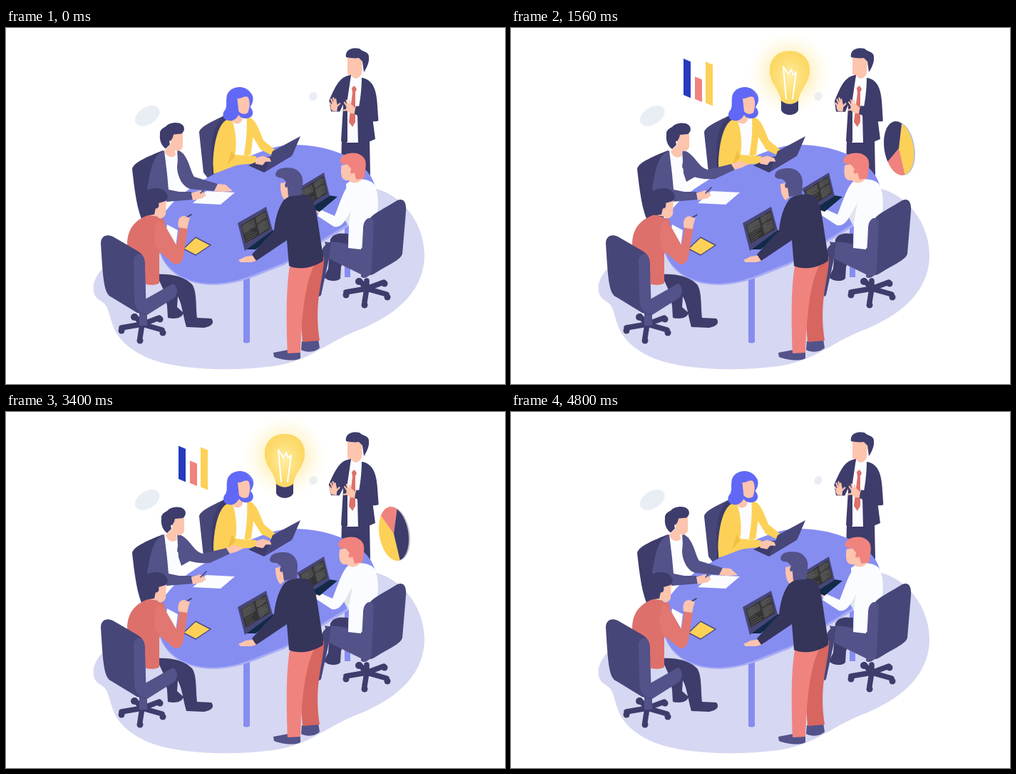
Animation of 700x500 px, one loop 4.84 s. Source, as an HTML page:

```html
<!DOCTYPE html>
<html lang="en">
<head>
<meta charset="utf-8">
<title>Team meeting</title>
<style>
html, body { margin: 0; width: 100%; height: 100%; overflow: hidden; background: #fff; }
svg { display: block; width: 100vw; height: 100vh; }
.navy { fill: #3d3c6b; } .slate { fill: #474679; } .steel { fill: #535289; }
.skin { fill: #fdc4ae; } .red { fill: #de706c; } .coral { fill: #f0837e; }
.yellow { fill: #fdd157; } .white { fill: #fbfcff; } .table { fill: #868df1; }
.line { fill: none; stroke-linecap: round; stroke-linejoin: round; }
</style>
</head>
<body>
<svg viewBox="0 0 700 500">
<defs>
  <radialGradient id="halo">
    <stop offset=".4" stop-color="#ffe58a" stop-opacity=".6"/>
    <stop offset=".7" stop-color="#fff0b8" stop-opacity=".3"/>
    <stop offset="1" stop-color="#fff8dc" stop-opacity="0"/>
  </radialGradient>
  <radialGradient id="shine">
    <stop offset="0" stop-color="#fff0a8"/>
    <stop offset="1" stop-color="#fbdc6c" stop-opacity=".6"/>
  </radialGradient>
  <clipPath id="screen"><path d="M0 0H35V27H0Z"/></clipPath>
  <path id="glass" d="M391 30C374 30 363 41 363 57C363 77 379 84 379 104H403C403 84 419 77 419 57C419 41 408 30 391 30Z"/>
  <g id="wheels">
    <path class="line" stroke="#3d3c6b" stroke-width="7.500" d="M191 405V418M162 421L191 416L219 424M188 435L191 416L215 407M191 416L181 405"/>
    <g class="navy"><circle cx="162" cy="425" r="4.500"/><circle cx="188" cy="439" r="4.500"/><circle cx="220" cy="428" r="4.500"/><circle cx="216" cy="409" r="4.500"/><circle cx="180" cy="406" r="5"/></g>
  </g>
</defs>

<path fill="#d6d7f2" d="M123 370C120 352 134 335 160 318L260 280L500 222C560 228 588 280 587 322C585 372 545 405 490 426C448 443 425 468 375 475C320 482 255 481 212 468C180 458 158 440 150 418C144 402 144 390 134 384C127 380 124 376 123 370Z"/>
<g fill="#e9eef5">
  <ellipse cx="198" cy="123.500" rx="19" ry="12" transform="rotate(-32 198 123)"/>
  <ellipse cx="431" cy="96" rx="5.500" ry="6.500" transform="rotate(25 431 96)"/>
</g>

<!-- back chairs -->
<path class="slate" d="M271 147C271 139 290 131 306 123L312 130L300 212H284L277 203Z"/>
<path class="navy" d="M306 123C294 134 288 148 288 180L289 212H302L312 130Z"/>
<path class="navy" d="M177 198C178 189 200 180 220 172L224 180L214 268H190C183 250 180 225 177 198Z"/>

<!-- presenter -->
<path class="navy" d="M471 156H510L511 207L470 196Z"/>
<path class="white" d="M483 67L500 70L495 161H478Z"/>
<path class="red" d="M485 84L489 81L492 86L490 90L490 132L486 139L481 132L486 91Z"/>
<path class="navy" d="M484 66L479 100L479 160L470 159L473 110L470 90C472 76 476 68 484 66ZM499 70C510 72 516 80 518 96L515 133L518 156L511 159L494 162L493 120C497 104 499 84 499 70Z"/>
<path class="skin" d="M479 40H500L499 64C495 72 488 73 485 67L479 65Z"/>
<path class="navy" d="M477 41C475 31 485 26 496 29C499 33 509 33 509 40C510 48 506 56 502 62L500 47L495 42C489 43 483 42 477 41Z"/>
<path class="navy" id="leftSleeve"/><path class="navy" id="rightSleeve"/>
<g id="leftHand">
  <path class="skin" d="M-6 4L-3 -3L2 -5L4 2L3 10L-4 9Z"/>
  <path class="line" stroke="#fdc4ae" stroke-width="2.200" d="M-4 3L-7 -2M-2 0L-5 -7M0 -1L-2 -9M2 0L1 -7M3 3L7 -1"/>
</g>
<g id="rightHand">
  <path class="skin" d="M-3 -4L3 -4L9 2L8 10L1 9L-4 5Z"/>
  <path class="line" stroke="#fdc4ae" stroke-width="2.200" d="M-2 0L-6 -6M-1 -2L-3 -9M2 -2L1 -8M-2 4L-7 5"/>
</g>

<!-- table -->
<path class="table" d="M333 340H342V441C340 443 335 443 333 441ZM475 270H483V350H475Z"/>
<path fill="#a9adf5" d="M212 292C212 338 248 361 290 361C330 360 350 348 390 333L480 279C510 264 523 248 519 225L212 280Z"/>
<path class="table" d="M212 290C212 335 247 359 290 359C330 358 350 344 390 330L480 275C508 261 521 247 518 225C512 188 458 164 405 164C372 164 340 180 300 201C260 221 212 252 212 290Z"/>

<!-- woman -->
<g id="woman">
  <path class="white" d="M318 131L340 128L337 184L321 184Z"/>
  <path class="yellow" d="M313 128C299 131 292 160 291 190L292 205L318 195C326 191 340 191 353 190L351 180L322 178C325 160 322 142 318 130ZM338 125C351 126 354 140 362 158L379 172L374 179L358 171L347 153L344 178L334 180C338 160 339 140 338 125Z"/>
  <path fill="#eab83f" d="M317 172L311 192L322 181Z" opacity=".7"/>
  <path class="skin" d="M321 120H332V129C330 136 320 136 318 130Z"/>
  <path fill="#6068f5" d="M310 98C311 82 334 78 343 90C350 97 347 106 343 111C350 118 347 127 337 127C332 127 329 125 327 122C323 129 318 131 313 130C304 129 303 120 308 115C311 109 309 104 310 98Z"/>
  <path class="skin" d="M325 99C330 100 335 94 340 97C344 104 342 113 340 119C335 122 330 121 327 117Z"/>
</g>
<path class="navy" d="M340 193L366 181L402 179L362 203Z"/>
<path class="slate" d="M374 173L413 152L402 178L363 202Z"/>
<path class="skin" id="typing" d="M350 182L360 179L370 182L372 187L364 187L360 192L350 190Z"/>

<!-- man in suit -->
<path class="white" d="M220 174L241 173L244 236H226Z"/>
<path class="steel" d="M222 172C206 178 203 198 198 226L206 238L226 244L262 241L260 230L243 230L228 227L226 205ZM240 170L249 177L260 208L246 216L242 204Z"/>
<path class="white" d="M262 246L281 229L321 231L301 248Z"/>
<path class="skin" d="M260 232L272 228L281 234L276 239L262 242Z"/>
<path class="line" stroke="#3d3c6b" stroke-width="1.500" d="M273 232L281 224"/>
<path class="steel" id="suitArm"/><path class="skin" id="suitHand"/>
<g id="suitHead">
  <path class="skin" d="M233 150L250 147L250 168C246 174 241 174 239 172L240 179C234 185 226 180 224 173L233 164Z"/>
  <path class="navy" d="M218 150C217 144 222 141 226 139C230 133 245 131 250 137C254 142 251 147 248 149L237 150C236 156 233 160 231 159L232 164L226 170C220 166 217 158 218 150Z"/>
</g>

<!-- man in red -->
<path class="white" d="M226 276L241 284L238 308L220 318Z"/>
<path class="yellow" stroke="#4d4c7d" stroke-width="1.500" stroke-linejoin="round" d="M249 310L266 294L287 305L266 319Z"/>
<path class="navy" d="M211 346C235 344 252 351 261 360C268 370 266 390 268 407L288 408C293 414 289 419 278 421L253 420C248 402 247 388 241 377L240 392L249 400C247 408 237 409 227 407L226 390L221 368Z"/>
<path class="steel" d="M190 384L234 359C241 362 242 372 236 379L198 403L190 400Z"/>
<use href="#wheels"/>
<path class="steel" d="M187 395H198V418H187Z"/>
<path class="red" d="M170 305C170 280 183 268 202 262L222 269L226 290L215 318V358C210 362 202 361 196 360L192 322Z"/>
<g id="redHead">
  <path class="skin" d="M208 243L225 240L224 262C220 269 215 268 212 265L202 263Z"/>
  <path class="navy" d="M190 242C190 233 195 230 200 227C208 223 222 225 225 232C229 238 225 242 224 243L214 246C216 252 211 255 210 253L208 262L199 263C193 258 190 250 190 242Z"/>
</g>
<g id="redArm">
  <path fill="#e27772" d="M213 272C207 283 206 302 214 313L234 330C242 335 247 329 249 320L255 281L244 277L239 305L224 279C220 272 216 270 213 272Z"/>
  <path class="line" stroke="#3d3c6b" stroke-width="1.600" d="M248 269L260 262"/>
  <path class="skin" d="M242 280C240 271 243 264 250 264L258 267L256 273L254 282Z"/>
</g>
<path class="slate" d="M133 303C133 292 141 289 150 293L181 311C192 317 195 322 195 335L196 403L184 400L148 378C137 374 136 350 133 303Z"/>
<path class="steel" d="M179 330C178 320 185 316 190 318C195 323 195 330 195 340L197 400C190 404 181 396 180 382Z"/>

<!-- man in white -->
<path class="navy" d="M455 297C460 287 470 288 480 289V304L470 336L469 352C463 357 452 356 446 350L452 338Z"/>
<path class="steel" d="M453 301C465 299 485 305 502 310L507 342L498 346L453 324L447 300Z"/>
<path class="slate" d="M456 301L453 324L442 375C440 378 436 378 434 375L442 318C443 309 447 303 456 301Z"/>
<use href="#wheels" x="315" y="-50"/>
<path class="white" d="M477 219C488 210 507 210 516 219C523 230 523 250 520 263L503 274L498 311L480 309L481 280L479 258Z"/>
<path fill="#dfe5e9" d="M487 240L472 262L480 278Z"/>
<g id="whiteArm">
  <path class="skin" d="M431 243L441 255L436 261L430 251Z"/>
  <path class="white" d="M480 216C472 222 466 242 458 262L438 253L434 262L457 277C465 279 471 272 475 265L489 240C493 225 488 214 480 216Z"/>
</g>
<g id="whiteHead">
  <path class="skin" d="M468 193L489 188L497 212C492 219 482 219 478 214C470 215 466 210 468 193Z"/>
  <path class="coral" d="M466 187C467 177 480 174 490 176C502 180 503 188 502 196L500 211L489 213L486 203C481 207 479 202 482 198L477 192C472 190 468 193 466 187Z"/>
</g>
<path class="slate" d="M509 270C512 262 530 254 549 242C558 238 562 245 561 258L556 317C554 326 535 333 515 346L500 350Z"/>
<path class="steel" d="M501 280C502 267 511 263 516 271L513 340C512 349 501 354 498 349Z"/>

<!-- laptops -->
<path fill="#122a48" d="M335 311L374 284L388 284L350 311ZM424 252L453 235L465 237L440 258Z"/>
<path class="slate" d="M325 274L365 251L374 284L335 313ZM408 226L446 203L454 236L424 255Z"/>
<g transform="matrix(1 -.59 .26 .96 329 277)" clip-path="url(#screen)" class="display"></g>
<g transform="matrix(.94 -.58 .22 .91 412 228)" clip-path="url(#screen)" class="display"></g>

<!-- standing man -->
<path class="steel" d="M375 456L396 452L413 454V464C404 469 386 466 376 462ZM415 440L438 437L440 449C434 456 421 456 414 452Z"/>
<path fill="#d76560" d="M430 328L446 321C447 350 431 380 440 439L416 441L412 390Z"/>
<path class="coral" d="M398 334L436 328C420 350 415 400 413 456L395 457C393 410 393 365 398 334Z"/>
<path class="skin" d="M350 319L336 321L326 326L329 329H344L354 326Z"/>
<path fill="#353459" d="M392 239C401 233 418 232 425 236C436 244 437 275 445 320V327C430 338 408 340 397 334L394 298L351 327L345 318L376 284C378 265 383 249 392 239Z"/>
<g id="standHead">
  <path class="skin" d="M378 219L389 217L391 237L385 242C380 237 378 229 378 219Z"/>
  <path class="steel" d="M370 207C371 199 380 197 389 197C400 196 410 205 409 218L408 234L390 237L388 224C384 227 383 220 386 217L380 212C374 212 370 211 370 207Z"/>
</g>

<!-- floating charts and bulb -->
<g id="bars" transform="translate(242 0) skewY(23)"></g>
<g id="pie"></g>
<g id="bulb">
  <circle id="glow" cx="391" cy="62" r="60" fill="url(#halo)"/>
  <use href="#glass" class="yellow"/>
  <use href="#glass" id="lit" fill="url(#shine)"/>
  <path class="line" stroke="#fff" stroke-width="2" d="M386 97L382 52L389 63L393 56L396 64L400 60L395 97"/>
  <path class="navy" d="M379 100Q391 109 403 100V113C400 122 382 122 379 113Z"/>
</g>
</svg>

<script>
const LOOP = 4840;
const $ = id => document.getElementById(id);
const clamp = u => Math.max(0, Math.min(1, u));
const smooth = u => (u = clamp(u), u * u * (3 - 2 * u));
const move = (id, value) => $(id).setAttribute('transform', value);

// Eased interpolation through [time, value, time, value, ...].
function track(t, ...keys) {
  let i = 0;
  while (i < keys.length - 4 && t > keys[i + 2]) i += 2;
  const [t0, a, t1, b] = keys.slice(i, i + 4);
  return a + (b - a) * smooth((t - t0) / (t1 - t0));
}

function morph(id, from, to, k) {
  const end = to.match(/-?[\d.]+/g);
  let i = 0;
  $(id).setAttribute('d', from.replace(/-?[\d.]+/g, n => +n + (end[i++] - n) * k));
}

function back(u) {
  u = clamp(u) - 1;
  return 1 + 2.4 * u ** 3 + 1.4 * u ** 2;
}
const pop = (t, start, length) =>
  Math.max(0, t < 3000 ? back((t - start) / length) : back((4770 - t) / 450));

function drawBars(t) {
  const grow = pop(t, 700, 380);
  const bar = (x, bottom, height, color) => {
    const h = Math.max(0, height * grow);
    return `<rect x="${x}" y="${bottom - h}" width="10" height="${h}" fill="${color}"/>`;
  };
  $('bars').innerHTML =
    bar(0, 94, track(t, 1560, 51, 2360, 48, 3400, 46.5, 4240, 49.5), '#263bbd') +
    bar(16, 93, track(t, 1560, 31.5, 2360, 33.5, 3400, 31.5, 4240, 30), '#f0837e') +
    bar(31, 92, track(t, 1560, 58, 2360, 59, 3400, 56, 4240, 55), '#fdd157');
}

function drawPie(t) {
  const turn = 11 + .0785 * (t - 1560);
  const point = deg => {
    const a = deg * Math.PI / 180;
    return `${Math.sin(a)} ${-Math.cos(a)}`;
  };
  const slice = (from, size, color) =>
    `<path fill="${color}" d="M0 0L${point(turn + from)}A1 1 0 0 1 ${point(turn + from + size)}Z"/>`;
  const disc = (x, content) => `<g transform="matrix(21 8 0 37 ${x} 0)">${content}</g>`;
  const y = track(t, 1560, 169, 2360, 171.5, 3400, 171, 4240, 171);
  move('pie', `translate(544 ${y}) scale(${pop(t, 1170, 350)})`);
  $('pie').innerHTML = disc(2, '<circle r="1" fill="#bfc0c9"/>') +
    disc(0, slice(0, 145, '#fdd157') + slice(145, 72, '#f0837e') + slice(217, 143, '#3d3c6b'));
}

function drawBulb(t) {
  const bob = 8 * Math.exp(-(((t - 2360) / 700) ** 2));
  const light = track(t, 620, 0, 1450, 1, 2420, .45, 3350, 1, 4080, 0);
  move('bulb', `translate(391 ${120 + bob}) scale(${pop(t, 130, 340)}) translate(-391 -120)`);
  $('glow').style.opacity = $('lit').style.opacity = light;
}

function drawPresenter(t) {
  const open = track(t, 0, .4, 240, 1, 480, 0, 860, 1, 1200, 0, 1560, .3, 1960, .9,
    2360, .55, 2860, 0, 3400, .45, 3800, 0, 4240, 1, 4560, .2, 4840, .4);
  morph('leftSleeve', 'M484 66C468 68 463 84 456 105L456 118L471 119L477 100Z',
    'M484 66C468 67 461 78 449 98L456 116L464 115L477 96Z', open);
  morph('rightSleeve', 'M499 70C514 72 518 87 519 104L520 131C514 134 500 127 486 119L489 109L505 110Z',
    'M499 70C516 72 521 87 523 104L526 129C519 133 503 130 492 122L494 110L507 112Z', open);
  move('leftHand', `translate(${466 - 12 * open} ${108 - 2 * open})`);
  move('rightHand', `translate(${478 + 7 * open} ${109 + 4 * open})`);
}

function drawTeam(t) {
  const rest = track(t, 40, 1, 430, 0, 4380, 0, 4770, 1);
  morph('suitArm', 'M243 172C259 178 262 196 276 199L309 191L314 199L286 212C262 214 246 207 240 195Z',
    'M242 172C256 178 258 200 264 209L297 219L292 229L258 226C246 222 240 206 240 195Z', rest);
  morph('suitHand', 'M309 191L320 187L334 191L324 196L314 199Z',
    'M297 219L308 220L318 229L304 230L292 229Z', rest);
  move('suitHead', `translate(${-2 * rest} ${-.5 * rest})`);
  move('standHead', `translate(${6 * rest} 0) rotate(${4 * rest} 398 236)`);
  move('whiteHead', `translate(${2.5 * rest} 0)`);
  move('whiteArm', `translate(${3 * rest} ${2 * rest})`);
  move('woman', `translate(${-.6 * rest} 0)`);
  const tap = t * Math.PI * 24 / LOOP;
  move('typing', `translate(${Math.sin(tap)} ${.8 * Math.cos(tap)})`);
  const nod = track(t, 480, 0, 1560, 1, 2360, 1, 3400, 0);
  move('redHead', `translate(${3 * nod} 0)`);
  move('redArm', `rotate(${.8 * nod} 225 320)`);
}

// Endless listing in two panes, repeated once for the wrap.
const seed = n => (Math.sin(n * 12.9898) * 43758.5453 % 1 + 1) % 1;
let listing = '';
for (let row = 0; row < 36; row++) {
  const n = row % 18;
  listing += `<path stroke="#6a6a6a" stroke-width=".6" d="M2 ${row * 3}h${5 + 11 * seed(n + 3)}M21 ${row * 3}h${4 + 8 * seed(n + 40)}"/>`;
}
document.querySelectorAll('.display').forEach(display => display.innerHTML =
  `<path fill="#333" d="M0 0H35V27H0Z"/><path fill="#4a4a4a" d="M1 2H18V13H1ZM20 2H34V10H20ZM20 12H34V25H20Z"/><g class="code">${listing}</g>`);
const codes = document.querySelectorAll('.code');

function frame(now) {
  const t = now % LOOP;
  drawBars(t);
  drawPie(t);
  drawBulb(t);
  drawPresenter(t);
  drawTeam(t);
  codes.forEach(code => code.setAttribute('transform', `translate(0 ${-54 * t / LOOP})`));
  requestAnimationFrame(frame);
}
frame(0);
</script>
</body>
</html>
```
